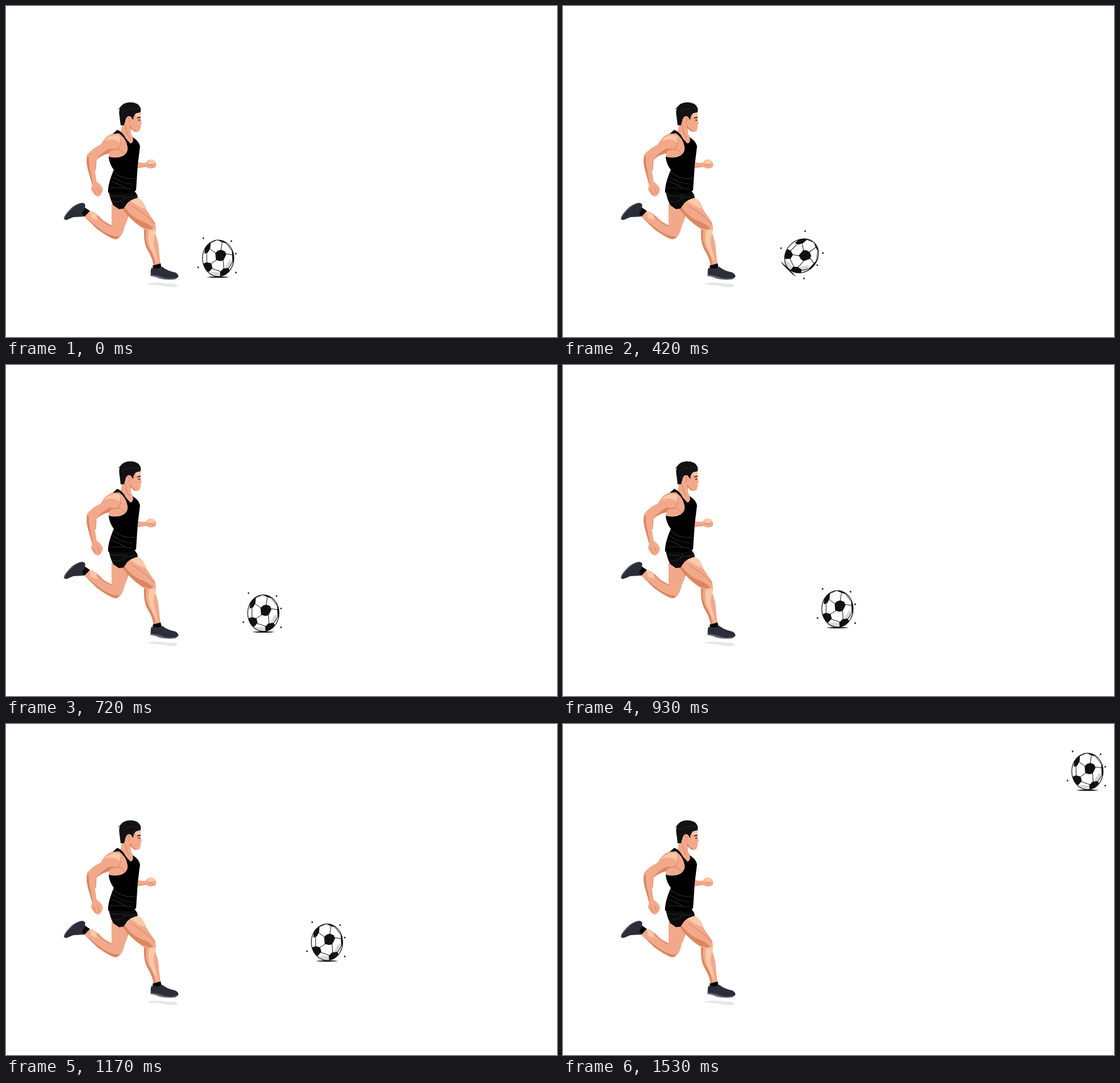
Recreate the animation shown at these times as an HTML page with a canvas. Size 966 by 580 pixels, loop 1.65 s.

```html
<!DOCTYPE html>
<html lang="en">
<head>
<meta charset="utf-8">
<title>Runner and ball</title>
<style>
html, body { margin: 0; width: 100%; height: 100%; overflow: hidden; background: #fff; }
canvas { display: block; }
</style>
</head>
<body>
<canvas id="stage" width="966" height="580"></canvas>
<script>
const ctx = document.getElementById('stage').getContext('2d');
const LOOP = 1650, STEP = 30, LAST = 51;
const SKIN = '#f2a98b', LIGHT = '#fac9a8', SHADE = '#dc8660', INK = '#121212', FOLD = '#242424', SHOE = '#2b2e38';

// Keyframes: step, then value(s)
const pathKeys = [[0, 372, 442], [30, 471, 433], [45, 624, 348.5], [51, 919.5, 83]];
const turnKeys = [[0, 0], [9, 90], [19, 0], [51, 0]];

function sample(keys, step) {
  let i = 0;
  while (i < keys.length - 2 && step > keys[i + 1][0]) i++;
  const a = keys[i], b = keys[i + 1];
  const p = (step - a[0]) / (b[0] - a[0]);
  return a.slice(1).map((v, k) => v + (b[k + 1] - v) * p);
}

function fill(color, d) {
  ctx.fillStyle = color;
  ctx.fill(new Path2D(d));
}

function line(color, width, d) {
  ctx.strokeStyle = color;
  ctx.lineWidth = width;
  ctx.stroke(new Path2D(d));
}

function drawLegs() {
  fill('#e7e7e8', 'M248 486Q262 483 280 486L297 487Q303 490 299 492Q288 494 273 490L251 488Z');

  // Rear leg
  fill(SKIN, 'M185 346L199 355L217 349Q216 372 208 386Q204 406 193 409Q184 409 160 391L138 370L146 359Q158 361 171 376L185 384Z');
  fill(LIGHT, 'M147 360L158 365L160 375L149 371Z');
  fill(SHADE, 'M139 370L160 387Q180 404 199 404Q196 409 190 408Q180 405 160 391Z');
  line(SHADE, 1.2, 'M160 368Q172 382 186 386');
  fill(SHADE, 'M205 356L217 350L214 371Q211 361 205 356Z');
  fill('#050505', 'M130 366L138 353L147 359L138 369Z');
  fill(SHOE, 'M102 374Q100 370 108 361Q118 349 126 347Q137 342 139 349L138 356L133 364Q139 368 136 369L118 370L106 375Z');
  line('#656b76', 1.2, 'M102 373Q103 366 114 356Q124 346 134 345');

  // Front leg
  fill(SKIN, 'M203 355L216 342L230 336Q241 340 246 357L261 379Q264 389 262 399L267 416Q269 438 271 454L259 456Q257 441 248 427Q241 415 242 391Q225 381 203 355Z');
  fill(LIGHT, 'M216 340L230 336Q242 342 246 356Q234 354 216 340Z');
  fill(SHADE, 'M204 355L208 353Q220 370 238 377Q254 383 258 391Q247 392 238 387Q220 377 204 355Z');
  fill(LIGHT, 'M251 393L262 391L262 400Q255 410 263 434L267 453Q259 437 252 422Q248 405 251 393Z');
  fill(SHADE, 'M242 391L246 393Q243 410 250 423Q260 437 262 455L259 456Q257 441 248 427Q241 415 242 391Z');
  line(SHADE, 1.2, 'M220 350Q246 365 261 382');
  fill('#050505', 'M257 455L271 451L273 459L258 463Z');
  fill('#656b76', 'M254 468L253 473Q262 474 270 478Q284 481 297 479L302 475Z');
  fill(SHOE, 'M255 459L266 460L274 457Q282 464 297 467Q303 470 302 475Q294 479 279 477Q264 471 254 471Q253 464 255 459Z');
}

function drawBody() {
  // Far forearm and fist
  fill(SKIN, 'M230 274L245 275L249 270Q257 268 261 272Q265 278 262 283L253 285L245 282L230 284Z');
  fill(LIGHT, 'M249 271L258 269L262 274L255 277L248 276Z');
  line(SHADE, 1.1, 'M231 283L245 281M248 279L255 278L258 282');

  // Neck and near arm
  fill(SKIN, 'M204 204L219 210L219 223L227 238L218 243L200 227Z');
  fill(SKIN, 'M199 222Q211 231 214 245Q215 257 203 263Q193 267 180 264L181 257Q165 263 158 271L156 289L159 308Q167 313 170 321Q169 330 162 334Q154 333 149 321L151 312L146 295L141 275L142 261Q153 248 166 243Q176 224 191 223Z');
  fill(LIGHT, 'M173 236Q181 225 197 226Q205 233 201 241Q195 233 183 234Z');
  fill(SHADE, 'M142 263L145 264Q145 278 149 295L152 311L151 313L146 295Q140 278 142 263Z');
  fill(SHADE, 'M159 268Q168 257 181 250L202 251L184 253L181 258Q166 262 159 268Z');
  line(SHADE, 1.2, 'M200 232Q204 243 196 250M193 250Q205 252 208 260M158 271L157 288M153 320L158 331M160 318L164 329');
  line(SHADE, 1.3, 'M209 209Q211 222 216 230');

  // Shorts
  fill('#0b0b0b', 'M180 325L224 322L230 331L231 336Q219 339 213 345L206 355L198 356L188 349Q183 340 180 325Z');
  line(FOLD, 1.3, 'M183 332Q200 335 213 331M188 342Q200 346 208 337M205 336L229 334');

  // Tank top
  fill('#000', 'M187 224L195 217Q204 220 210 232L218 241Q225 239 222 230Q233 236 235 246L231 278L228 323Q216 331 203 327L179 327Q178 313 189 287Q181 277 180 264Q195 268 206 262Q215 256 213 246Q210 231 198 223Z');
  line(FOLD, 1.4, 'M189 290Q201 304 226 302M187 299Q202 311 222 312M185 307Q201 313 211 320M183 319Q200 317 221 321');
}

function drawHead() {
  fill(SKIN, 'M207 207L211 193Q215 189 222 193L227 186L236 185L236 196L238 206L236 208L236 213L234 219Q230 222 225 220L217 213Z');
  fill(LIGHT, 'M227 188L235 187L235 193L228 194Z');
  fill(SHADE, 'M217 208L222 215L229 220L225 220L217 213Z');
  fill(INK, 'M201 209L199 193Q196 177 207 171Q220 166 231 172Q238 178 236 186L228 188Q223 192 223 200L219 194Q213 191 210 198L207 209Z');
  line('#282828', 1, 'M203 187Q215 177 234 180');
  line(INK, 1, 'M197 181Q207 168 222 170');
  line(SHADE, 1.1, 'M213 197Q218 195 217 201L215 205');
  line(INK, 1.3, 'M230 196L236 195M232 200L235 200');
}

function drawBall(x, y, degrees) {
  ctx.save();
  ctx.translate(x, y);
  ctx.rotate(degrees * Math.PI / 180);

  const outline = new Path2D();
  outline.ellipse(0, 0, 27.5, 32, 0, 0, Math.PI * 2);
  ctx.fillStyle = '#fff';
  ctx.fill(outline);

  ctx.save();
  ctx.clip(outline);
  fill('#d8d8d8', 'M19 4L27 3L24 15L17 19L12 16Z');
  fill('#d8d8d8', 'M-16 24L-7 24L3 25L5 33L-10 32Z');
  // Seams from the centre patch outwards, then around the ring
  line(INK, 1, 'M-4 -9L-14 -16M5 -15L7 -28M13 -8L25 -6M9 4L10 18M-3 3L-12 9');
  line(INK, 1, 'M-13 -27L-4 -31M14 -26L25 -12M25 7L18 18M4 23L-11 18M-20 8L-20 -9');
  fill(INK, 'M-5 -9L-1 -13L5 -15L12 -12L14 -6L9 4L3 5L-4 3Z');
  fill(INK, 'M-24 -9L-23 -22L-13 -28L-14 -17L-18 -10L-23 -8Z');
  fill(INK, 'M-4 -33L7 -28L14 -26L15 -32Z');
  fill(INK, 'M-28 10L-20 7L-12 9L-10 17L-16 24L-23 21Z');
  fill(INK, 'M3 24L9 18L18 17L20 21L13 32L4 32Z');
  fill(INK, 'M24 -12L29 -10L29 8L25 7Z');
  ctx.restore();

  ctx.strokeStyle = INK;
  ctx.lineWidth = 1.2;
  ctx.stroke(outline);
  fill('#111', 'M-20 33Q-10 31.6 0 32Q10 31.6 20 33Q10 34.5 0 34.2Q-10 34.5 -20 33Z');

  for (const [sx, sy] of [[-26, -35], [23, -30], [31, -8], [31, 25], [-35, 16]]) {
    fill(INK, `M${sx} ${sy - 2}l.8 1.2 1.2 .8-1.2 .8-.8 1.2-.8-1.2-1.2-.8 1.2-.8Z`);
  }
  ctx.restore();
}

function render(now) {
  const step = Math.min(LAST, Math.floor(now % LOOP / STEP));
  const [x, y] = sample(pathKeys, step);
  const [degrees] = sample(turnKeys, step);
  ctx.fillStyle = '#fff';
  ctx.fillRect(0, 0, 966, 580);
  drawLegs();
  drawBody();
  drawHead();
  drawBall(x, y, degrees);
  requestAnimationFrame(() => render(performance.now() - start));
}

const start = performance.now();
render(0);
</script>
</body>
</html>
```
